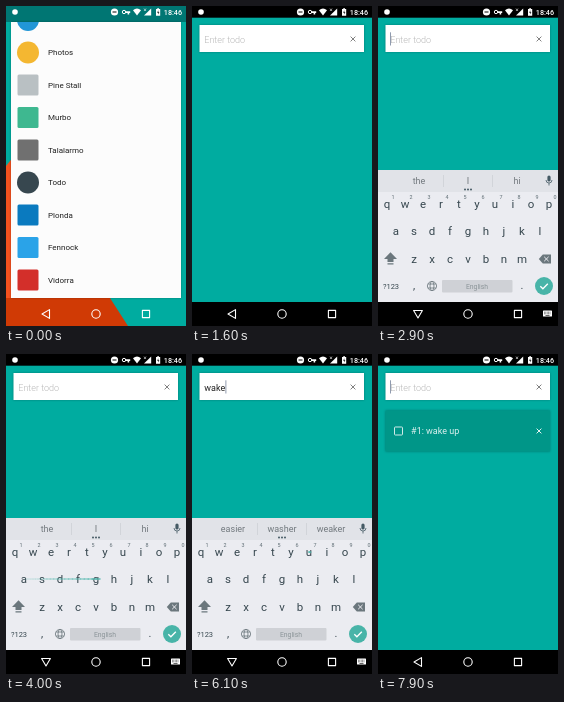
Animation, 180 px wide and 320 px high, one loop 8000 ms. Source, as an HTML page:

```html
<!DOCTYPE html>
<html lang="en">
<head>
<meta charset="utf-8">
<title>Todo demo</title>
<style>
html, body { margin: 0; width: 100%; height: 100%; overflow: hidden; background: #000; }
svg { display: block; width: 100vw; height: 100vh; font-family: Roboto, "Noto Sans", sans-serif; }
.card { filter: drop-shadow(0 .7px .8px rgba(0, 0, 0, .28)); }
.line { fill: none; stroke-width: 1; }
.mid { text-anchor: middle; }
</style>
</head>
<body>
<svg id="stage" viewBox="0 0 180 320">
  <defs>
    <clipPath id="listClip"><rect x="5" y="16" width="170" height="276"/></clipPath>
    <clipPath id="openClip"><rect id="opening"/></clipPath>
    <clipPath id="boardClip"><rect y="160" width="180" height="136"/></clipPath>
  </defs>

  <g id="launcher">
    <rect width="180" height="320" fill="#00aca0"/>
    <rect width="180" height="16" fill="#007673"/>
    <path d="M0 160L20 135L104 292H0Z" fill="#f4511e"/>
    <path d="M0 292H104L122 320H0Z" fill="#d03a05"/>
    <rect class="card" x="5" y="16" width="170" height="276" fill="#fcfcfc"/>
    <rect id="rowTap" x="5" y="161" width="170" height="32" fill="#000"/>
    <g id="apps" clip-path="url(#listClip)" font-size="8" fill="#212121"></g>
  </g>

  <g id="app" clip-path="url(#openClip)">
    <rect width="180" height="320" fill="#303030"/>
    <g id="content">
      <rect width="180" height="320" fill="#00aca0"/>
      <rect class="card" x="7.5" y="19" width="164.5" height="27" fill="#fff"/>
      <text id="hint" x="12.3" y="36.6" font-size="9" font-weight="300" fill="#b8b8b8">Enter todo</text>
      <text id="entry" x="12.3" y="36.6" font-size="9" fill="#222" xml:space="preserve"></text>
      <rect id="underline" x="12.3" y="37.6" width="21" height=".7" fill="#333"/>
      <rect id="cursor" y="26.3" width=".8" height="13.2" fill="#75829b"/>
      <path class="line" d="M158.6 30.6l4.8 4.8m0-4.8l-4.8 4.8" stroke="#808080"/>
      <g id="item">
        <rect class="card" x="7.5" y="56.5" width="164.5" height="41" fill="#009688"/>
        <rect class="line" x="16.5" y="73" width="8" height="8" rx=".8" stroke="#cfebe8"/>
        <text x="33.1" y="80.2" font-size="9" fill="#dcf1ef">#1: wake up</text>
        <path class="line" d="M158.6 74.6l4.8 4.8m0-4.8l-4.8 4.8" stroke="#e6f5f3"/>
      </g>
      <g clip-path="url(#boardClip)">
        <g id="board">
          <rect y="164" width="180" height="132" fill="#ebecf1"/>
          <rect y="164" width="180" height="22" fill="#e1e3e8"/>
          <path d="M65.5 169v12M114.5 169v12" stroke="#c6c9ce" stroke-width=".6"/>
          <g id="words" class="mid" font-size="9" fill="#72797e"></g>
          <g fill="#455a64">
            <circle cx="87" cy="183.5" r="1"/><circle cx="90" cy="183.5" r="1"/><circle cx="93" cy="183.5" r="1"/>
            <rect x="169.4" y="169.5" width="3.2" height="6" rx="1.6"/>
          </g>
          <path d="M168 174a3 3 0 0 0 6 0M171 177v2.5" fill="none" stroke="#455a64" stroke-width=".8"/>
          <rect x="64" y="274" width="70.5" height="12.5" rx="1" fill="#cfd1d6"/>
          <text class="mid" x="99" y="282.6" font-size="6.8" fill="#8b9498">English</text>
          <g id="keys" class="mid" fill="#37474f"></g>
          <path d="M12.5 246.3l6.5 6.7h-3.5v3h-6v-3H6ZM9.5 257.2h6v1.3h-6Z" fill="#6b777d"/>
          <path d="M164.8 248.5H173v9h-8.2L160.8 253Z" fill="#6b777d"/>
          <path d="M166.2 250.8l4.4 4.4m0-4.4l-4.4 4.4" stroke="#ebecf1"/>
          <g fill="none" stroke="#6b777d" stroke-width=".8">
            <circle cx="54" cy="280" r="4.6"/><ellipse cx="54" cy="280" rx="2" ry="4.6"/>
            <path d="M50 278h8M50 282h8"/>
          </g>
          <circle id="done" cx="166" cy="280" r="9"/>
          <path d="M162.3 280.2l2.6 2.6l4.9-5.1" fill="none" stroke="#fff" stroke-width="1.3"/>
          <g id="trail" stroke="#4db6ac" stroke-linecap="round"></g>
        </g>
        <rect id="edge" y="294" width="180" height="2" fill="#4f2d19"/>
      </g>
    </g>
    <rect width="180" height="11.7" fill="#000"/>
    <rect y="296" width="180" height="24" fill="#000"/>
  </g>

  <g fill="#fff">
    <circle cx="9" cy="6" r="2.8"/>
    <circle cx="108.5" cy="6" r="3.6"/>
    <rect x="106.5" y="5.4" width="4" height="1.2" fill="#333"/>
    <path d="M119.8 5.2h4.4v1.7h-1v1.5h-1.6V6.9h-1.8Z"/>
    <circle class="line" cx="118" cy="6" r="1.7" stroke="#fff" stroke-width="1.3"/>
    <path d="M127 4.2Q131 1 135 4.2L131 9.5Z"/>
    <path d="M145.2 2.4V9.6H138Z"/>
    <path d="M138 2.6l2 2.4m0-2.4l-2 2.4" stroke="#fff" stroke-width=".6"/>
    <path d="M151.2 2.2h1.8v.9h1.2v6.7h-4.2V3.1h1.2Z"/>
    <path d="M152.4 4.2l-1.4 2.6h1v1.8l1.4-2.6h-1Z" fill="#333"/>
    <text x="157.8" y="8.8" font-size="7.2" font-weight="500">18:46</text>
  </g>
  <g fill="none" stroke="#fff" stroke-width="1.1" stroke-linejoin="round">
    <path id="back" d="M36 308l7.5-4.4v8.8Z"/>
    <path id="down" d="M40 312l-4.4-7.5h8.8Z"/>
    <circle cx="90" cy="308" r="4.2"/>
    <rect x="136.4" y="304.4" width="7.2" height="7.2"/>
  </g>
  <g id="switcher">
    <rect x="165" y="304.5" width="9" height="6" rx=".6" fill="#fff"/>
    <path d="M166 306.2h7M166 307.8h7" stroke="#000" stroke-width=".7" stroke-dasharray=".8 .6"/>
    <path d="M167.5 309.5h4" stroke="#000" stroke-width=".6"/>
  </g>
</svg>
<script>
const LOOP = 8000;
const $ = id => document.getElementById(id);
const clamp = v => Math.max(0, Math.min(1, v));
const ramp = (t, a, b) => clamp((t - a) / (b - a));
const mix = (a, b, p) => a + (b - a) * p;
const smooth = p => p * p * (3 - 2 * p);
const easeOut = p => 1 - (1 - p) ** 3;
const within = (t, a, b) => t >= a && t < b;
const set = (el, attrs) => { for (const k in attrs) el.setAttribute(k, attrs[k]); };
const show = (id, on) => set($(id), { visibility: on ? "inherit" : "hidden" });

function add(parent, tag, attrs, text = "") {
  const el = document.createElementNS("http://www.w3.org/2000/svg", tag);
  set(el, attrs);
  el.textContent = text;
  return $(parent).appendChild(el);
}

// App list: label, icon colour, round icon
[
  ["", "#2196d6", true],
  ["Photos", "#f4b731", true],
  ["Pine Stall", "#b9c0c3"],
  ["Murbo", "#3eb890"],
  ["Talalarmo", "#707070"],
  ["Todo", "#37474f", true],
  ["Plonda", "#0a7abf"],
  ["Fennock", "#2aa3e8"],
  ["Vidorra", "#d32f2a"]
].forEach(([label, fill, round], i) => {
  const y = 14 + i * 32.5;
  if (round) add("apps", "circle", { cx: 22, cy: y, r: 11, fill });
  else add("apps", "rect", { x: 11.5, y: y - 10.5, width: 21, height: 21, rx: 1.5, fill });
  add("apps", "text", { x: 42, y: y + 2.8 }, label);
});

// Keyboard letters
[["qwertyuiop", 9, 202], ["asdfghjkl", 18, 229], ["zxcvbnm", 36, 256.5]].forEach(([row, x0, y], r) => {
  [...row].forEach((c, i) => {
    const x = x0 + i * 18;
    add("keys", "text", { x, y, "font-size": 11.5 }, c);
    if (!r) add("keys", "text", { x: x + 6, y: 192.5, "font-size": 5.4, fill: "#5f6d74" }, (i + 1) % 10);
  });
});
add("keys", "text", { x: 13, y: 282.8, "font-size": 7.5 }, "?123");
add("keys", "text", { x: 36, y: 283, "font-size": 11 }, ",");
add("keys", "text", { x: 144, y: 283, "font-size": 11 }, ".");

const words = [41, 90, 139].map(x => add("words", "text", { x, y: 178 }));
const SEGMENTS = 24;
const trail = Array.from({ length: SEGMENTS }, () => add("trail", "line", {}));

// Finger paths as [time, x, y]
const WAKE = [[3100, 27, 198], [3450, 18, 225], [4350, 132, 225], [4800, 51, 198]];
const UP = [[6050, 117, 198], [6500, 165, 200]];

function fingerAt(path, t) {
  if (t <= path[0][0]) return path[0].slice(1);
  for (let i = 1; i < path.length; i++) {
    const [ta, xa, ya] = path[i - 1], [tb, xb, yb] = path[i];
    if (t <= tb) {
      const p = smooth(ramp(t, ta, tb));
      return [mix(xa, xb, p), mix(ya, yb, p)];
    }
  }
  return path[path.length - 1].slice(1);
}

function drawTrail(t) {
  const path = t < 5600 ? WAKE : UP;
  const now = path === UP ? Math.min(t, 6540) : t;
  const start = path[0][0], end = path[path.length - 1][0], life = 500;
  trail.forEach((line, i) => {
    const a = now - life * (i + 1) / SEGMENTS, b = now - life * i / SEGMENTS;
    const live = b > start && a < end;
    const [x1, y1] = fingerAt(path, a), [x2, y2] = fingerAt(path, b);
    const fresh = 1 - i / SEGMENTS;
    set(line, { x1, y1, x2, y2, "stroke-width": mix(.9, 1.8, fresh), opacity: live ? mix(.1, .65, fresh) : 0 });
  });
}

function suggestions(t) {
  if (t < 4800) return ["the", "I", "hi"];
  if (t < 6600) return ["easier", "washer", "weaker"];
  return ["you", "IP", "UI"];
}

function drawField(t) {
  const text = within(t, 4800, 6400) ? "wake" : within(t, 6400, 6600) ? "wake up" : "";
  $("entry").textContent = text;
  show("hint", !text);
  show("underline", within(t, 4800, 5300));
  // The blink restarts on every edit
  const edit = [6600, 6400, 4800, 2500].find(e => t >= e);
  show("cursor", edit !== undefined && Math.floor((t - edit) / 500) % 2 === 0);
  set($("cursor"), { x: text ? 12.6 + $("entry").getComputedTextLength() : 12 });
  show("item", t >= 6600);
}

function drawBoard(t) {
  const up = easeOut(ramp(t, 1950, 2300)) * (1 - ramp(t, 6740, 7040));
  set($("board"), { opacity: up, transform: `translate(0 ${15 * (1 - up)})` });
  show("edge", within(t, 6740, 6900));
  set($("done"), { fill: t < 6500 ? "#48b4a8" : "#1fa295" });
  suggestions(t).forEach((w, i) => words[i].textContent = w);
  const open = within(t, 2000, 6740);
  show("back", !open);
  show("down", open);
  show("switcher", open);
}

function render(t) {
  const p = easeOut(ramp(t, 200, 680));
  const top = mix(166, 0, p), left = mix(11, 0, p);
  set($("opening"), { x: left, y: top, width: mix(22, 180, p), height: mix(22, 320, p) });
  set($("app"), { opacity: ramp(t, 200, 400) });
  set($("rowTap"), { opacity: .1 * ramp(t, 80, 180) });
  set($("content"), { opacity: smooth(ramp(t, 980, 1300)) });
  drawField(t);
  drawBoard(t);
  drawTrail(t);
}

const begin = performance.now();
function tick() {
  render((performance.now() - begin) % LOOP);
  requestAnimationFrame(tick);
}
render(0);
requestAnimationFrame(tick);
</script>
</body>
</html>
```
